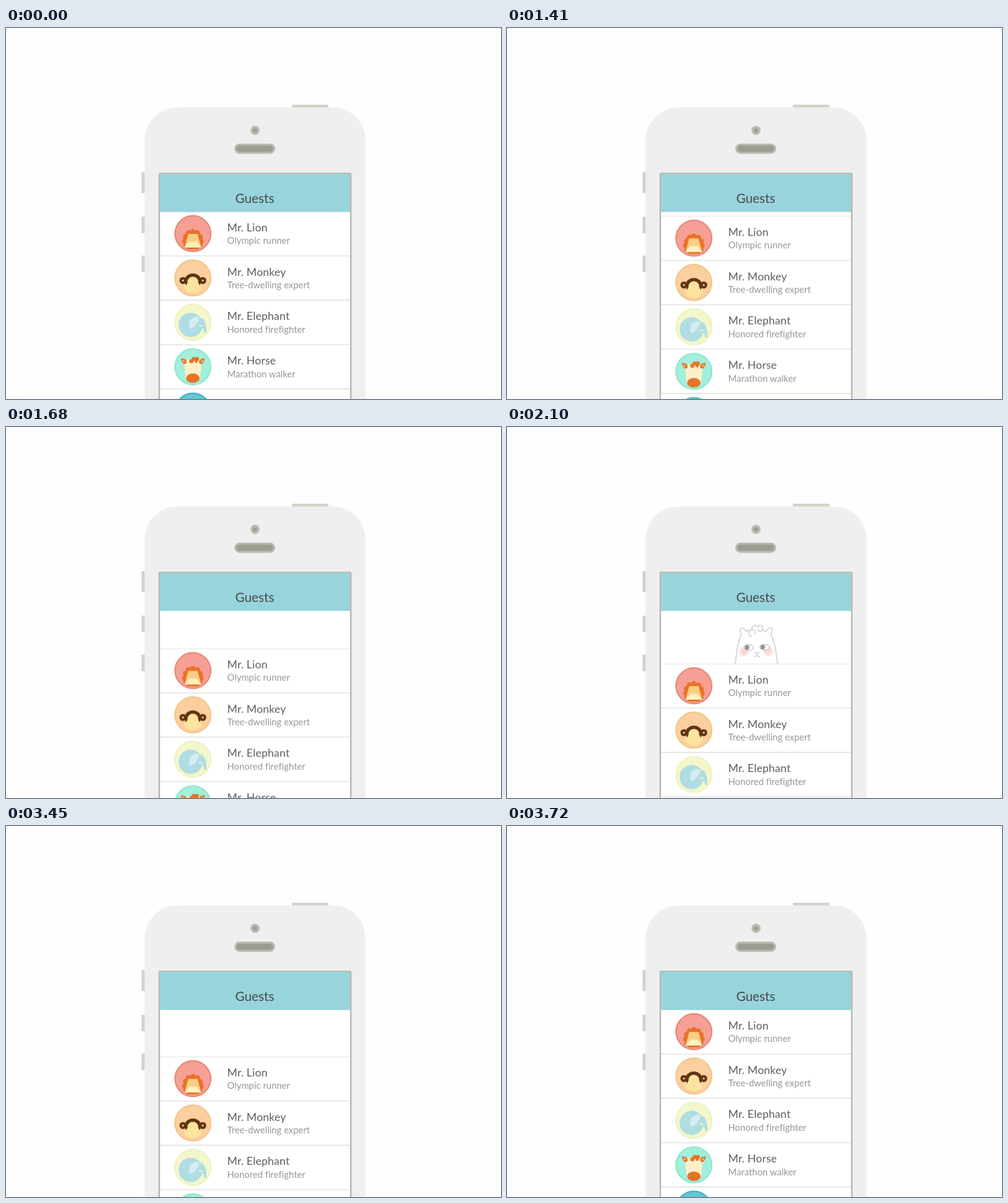
Recreate the animation shown at these times as an HTML page. Size 800 by 600 pixels, loop 3.75 s.

```html
<!DOCTYPE html>
<html lang="en">
<head>
<meta charset="utf-8">
<title>Guest list pull to refresh</title>
<style>
html, body { margin: 0; width: 100%; height: 100%; overflow: hidden; background: #fefefe; }
svg { display: block; width: 800px; height: 600px; font-family: Lato, "Open Sans", sans-serif; }
.title { font-size: 20.8px; fill: #48494a; text-anchor: middle; }
.name { font-size: 17.6px; letter-spacing: .2px; fill: #5c5d5e; }
.role { font-size: 14.8px; letter-spacing: .03px; fill: #969696; }
.rule { stroke: #dedeDA; stroke-width: 1.4; }
.metal { fill: #d3d3cb; }
.disc { stroke-width: 2.2; }
.line { fill: none; stroke: #cecece; stroke-width: 1.5; stroke-linecap: round; stroke-linejoin: round; }
.list, .llama, .pupils { animation: 3750ms infinite cubic-bezier(.37, 0, .63, 1); }
.list { animation-name: pull; }
.llama { animation-name: peek; }
.pupils { animation-name: look; }
@keyframes pull {
  0%, 34.6% { transform: translateY(0); }
  50.6%, 89.95% { transform: translateY(86px); }
  99.28%, 100% { transform: translateY(0); }
}
@keyframes peek {
  0%, 45.333% { transform: translateY(70px); }
  55.2%, 87.2% { transform: translateY(0); }
  92.8%, 100% { transform: translateY(70px); }
}
@keyframes look {
  0%, 62% { transform: translateX(-2.5px); }
  65%, 74% { transform: translateX(2.5px); }
  77%, 100% { transform: translateX(.5px); }
}
</style>
</head>
<body>
<svg viewBox="0 0 800 600">
  <defs>
    <clipPath id="screen"><rect x="249" y="236" width="307" height="364"/></clipPath>
    <radialGradient id="blush">
      <stop offset="0" stop-color="#fbd3d0"/>
      <stop offset=".55" stop-color="#fcdeda"/>
      <stop offset="1" stop-color="#fff" stop-opacity="0"/>
    </radialGradient>
  </defs>

  <!-- Phone -->
  <rect class="metal" x="462" y="124" width="59" height="8" rx="1.5"/>
  <rect class="metal" x="219" y="233" width="8" height="34" rx="1.5"/>
  <rect class="metal" x="219" y="305" width="8" height="27" rx="1.5"/>
  <rect class="metal" x="219" y="368" width="8" height="27" rx="1.5"/>
  <rect x="224" y="128.500" width="357" height="560" rx="53" fill="#efefef"/>
  <circle cx="402.500" cy="165.500" r="7.400" fill="#bbbbb1"/>
  <circle cx="402.500" cy="165.500" r="3.300" fill="#9c9c91"/>
  <rect x="369" y="187" width="66" height="16.500" rx="8.200" fill="#b9b9af"/>
  <rect x="372.500" y="190.300" width="59" height="10" rx="5" fill="#9c9c91"/>
  <rect x="246.500" y="234" width="312" height="400" rx="2.500" fill="#b9b9b0"/>

  <g clip-path="url(#screen)">
    <rect x="249" y="236" width="307" height="364" fill="#fff"/>

    <g class="llama">
      <path class="line" d="M369 384C371 364 373 345 379 335C376 331 376 328 378.500 325C382 325 385 328 387.500 331M369 384V470H437V384C435 364 433 345 426 335C429 332 429 328 427.500 324.500C423 325 420 328 418.500 331"/>
      <path class="line" d="M387.500 331Q389 329.500 391.500 328.500M418.500 331Q416 329 413 328.500"/>
      <path class="line" d="M395 339C389.500 336 390 328 396 328.500C394 322 403 318.500 406 323.500C409 317.500 416 322 413 328C411 332 406 331 406 328M396 328.500C401 327 404 332 400 334"/>
      <circle cx="383" cy="363" r="10.500" fill="url(#blush)"/>
      <circle cx="422" cy="362.500" r="10.500" fill="url(#blush)"/>
      <g fill="#fff" stroke="#bcc0c1" stroke-width="1.2">
        <ellipse cx="390.500" cy="356.500" rx="7.800" ry="4.600"/>
        <ellipse cx="416.500" cy="356" rx="7.800" ry="4.600"/>
      </g>
      <g class="pupils" fill="#8f979a">
        <circle cx="390.500" cy="356.500" r="3.700"/>
        <circle cx="416" cy="356" r="3.700"/>
      </g>
      <path class="line" d="M400.500 364.500Q404 368 407.500 364.500M404 366.500V369.500M400 371.500Q404 369 408 371.500"/>
    </g>

    <g class="list">
      <rect x="249" y="297" width="307" height="420" fill="#fff"/>
      <path d="M249 297.300H556" stroke="#e9e9e6" stroke-width="1.2"/>
      <path class="rule" d="M249 368.600H556M249 440.300H556M249 512.100H556M249 583.800H556"/>

      <!-- Lion -->
      <g transform="translate(302 332.600)">
        <circle class="disc" r="28.900" fill="#f6a095" stroke="#e98777"/>
        <g fill="#e87229">
          <path d="M-9-2H9L14 12L9 25.500H-9L-14 12Z"/>
          <circle cx="0" cy="-3" r="4.500"/>
          <circle cx="-7" cy="-1" r="4.500"/>
          <circle cx="7" cy="-1" r="4.500"/>
          <circle cx="-11.500" cy="5" r="4.500"/>
          <circle cx="11.500" cy="5" r="4.500"/>
          <circle cx="-13" cy="12" r="4.500"/>
          <circle cx="13" cy="12" r="4.500"/>
          <circle cx="-11" cy="18.500" r="4.500"/>
          <circle cx="11" cy="18.500" r="4.500"/>
        </g>
        <path d="M-7.500 .5H7.500L13.500 22.500H-13.500Z" fill="#fbcd83"/>
        <path d="M-6.500 13H6.500L13.500 22.500H-13.500Z" fill="#fdf0bd"/>
      </g>
      <text class="name" x="357.500" y="328.800">Mr. Lion</text>
      <text class="role" x="357.500" y="349.300">Olympic runner</text>

      <!-- Monkey -->
      <g transform="translate(302 404.350)">
        <circle class="disc" r="28.900" fill="#fbd09e" stroke="#f3c488"/>
        <g fill="#fbd09e" stroke="#5f3511" stroke-width="4">
          <circle cx="-16" cy="4" r="3.700"/>
          <circle cx="16" cy="4" r="3.700"/>
        </g>
        <ellipse cy="15" rx="14" ry="9.500" fill="#fbe4a0"/>
        <path d="M-11 8C-13-1-4-3 0-1C4-3 13-1 11 8Q0 14-11 8" fill="#fbe4a0"/>
        <path d="M-12 6.500C-10-8.500 10-8.500 12 6.500" fill="none" stroke="#5f3511" stroke-width="5.400"/>
        <path d="M-14 5L-8 6L-11 12ZM14 5L8 6L11 12Z" fill="#5f3511"/>
      </g>
      <text class="name" x="357.500" y="400.550">Mr. Monkey</text>
      <text class="role" x="357.500" y="421.050">Tree-dwelling expert</text>

      <!-- Elephant -->
      <g transform="translate(302 476.100)">
        <circle class="disc" r="28.900" fill="#f4f6cb" stroke="#f0f2bf"/>
        <path d="M14-8C20-3 22 3 22 16.500Q19 18 17.500 15Q18 8 12 8Z" fill="#afdde3"/>
        <circle cx="-3.500" cy="4" r="19.600" fill="#afdde3"/>
        <path d="M-6 8C-7-3-3-9 9-9C11-6 10-3 8.500-1C6 3 4 7-2 10Z" fill="#d3edf3"/>
        <path d="M10 4Q13 6 18 5Q15 8 10 7Z" fill="#f4f6cb"/>
      </g>
      <text class="name" x="357.500" y="472.300">Mr. Elephant</text>
      <text class="role" x="357.500" y="492.800">Honored firefighter</text>

      <!-- Horse -->
      <g transform="translate(302 547.900)">
        <circle class="disc" r="28.900" fill="#a2efdb" stroke="#8fe7d1"/>
        <path d="M-13.500-8C-12-14 12-14 13.500-8C14 2 12 8 12 17C11 27-11 27-12 17C-12 8-14 2-13.500-8Z" fill="#fdf0c8"/>
        <path d="M-19.500-14Q-9-13-10-7Q-12-3-15-5Q-18.500-8-19.500-14ZM19.500-14Q9-13 10-7Q12-3 15-5Q18.500-8 19.500-14Z" fill="#e57427"/>
        <path d="M-17-11Q-12.500-10-13.500-7.500Q-16-8-17-11ZM17-11Q12.500-10 13.500-7.500Q16-8 17-11Z" fill="#fdf0c8"/>
        <g fill="#e57427">
          <circle cx="-2.500" cy="-9" r="3.300"/>
          <circle cx="1.500" cy="-12.500" r="3.300"/>
          <circle cx="6.500" cy="-12.500" r="3.300"/>
          <circle cx="5.500" cy="-8.500" r="2.200"/>
          <ellipse cy="18.500" rx="11" ry="7.600"/>
        </g>
      </g>
      <text class="name" x="357.500" y="544.100">Mr. Horse</text>
      <text class="role" x="357.500" y="564.600">Marathon walker</text>

      <circle class="disc" cx="302" cy="619.500" r="28.900" fill="#60c7d3" stroke="#45b3c3"/>
    </g>

    <rect x="249" y="236" width="307" height="61.500" fill="#98d4dc"/>
    <text class="title" x="402" y="282.600">Guests</text>
  </g>
</svg>
</body>
</html>
```
